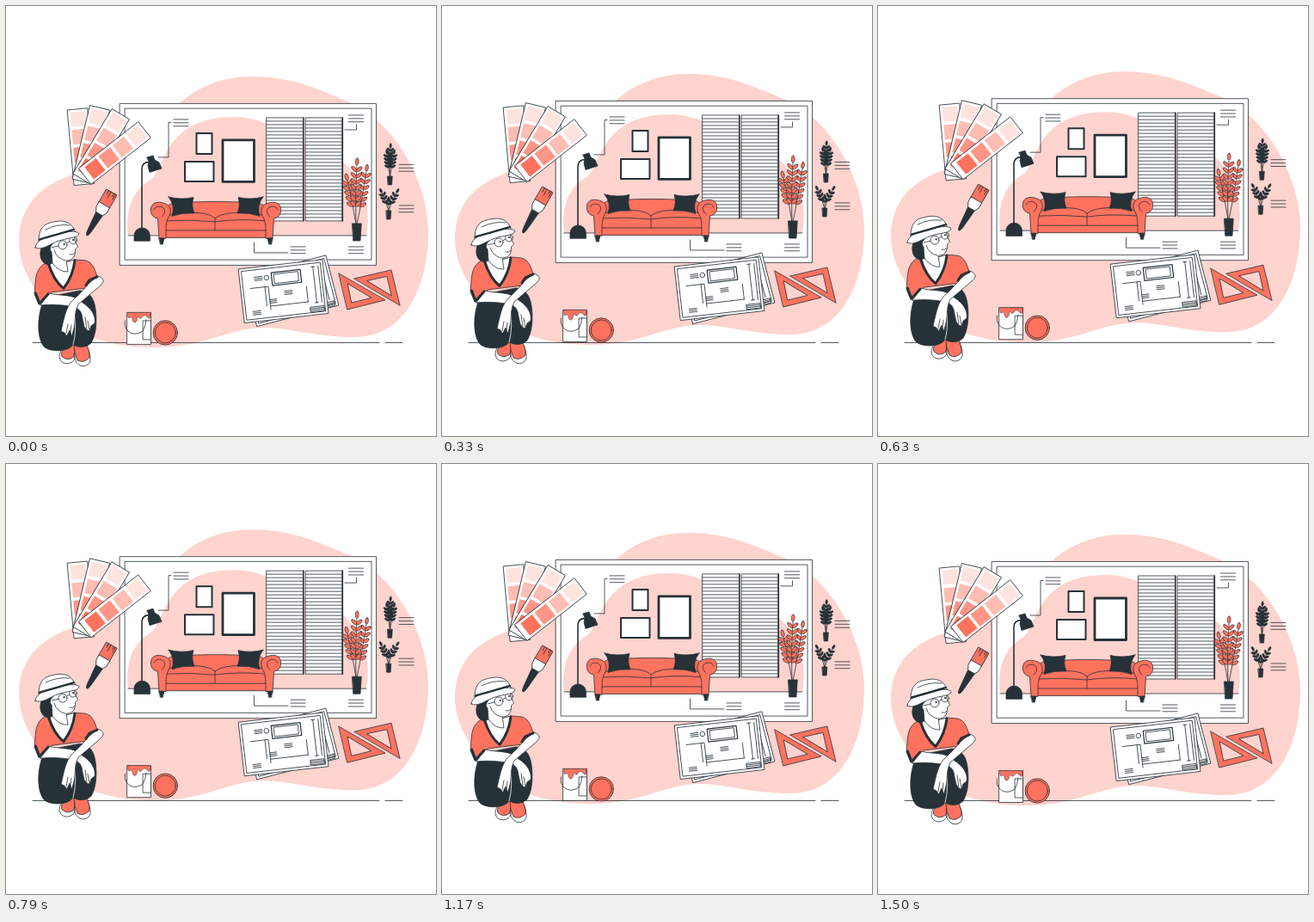
An HTML page that plays this animation: 500x500 px, repeating every 1540 ms.

```html
<!DOCTYPE html>
<html lang="en">
<head>
<meta charset="utf-8">
<title>Interior designer</title>
<style>
  html, body { margin: 0; width: 100%; height: 100%; overflow: hidden; background: #fff; }
  svg { display: block; width: 100%; height: 100%; fill: none; stroke: #263238; stroke-width: .8; stroke-linejoin: round; stroke-linecap: round; }
  .white { fill: #fff; }
  .coral { fill: #ff725e; }
  .dark { fill: #263238; }
  .pink { fill: #ffd3ce; stroke: none; }
</style>
</head>
<body>
<svg viewBox="0 0 500 500">
  <g class="float">
    <path class="pink" d="M202 113C222 95 250 82 287 82C335 82 370 100 400 112C452 135 491 205 491 262C491 330 462 385 405 385C360 385 330 374 300 374C260 374 230 397 175 397C140 397 120 392 104 387C70 370 15 330 15 272C16 225 50 204 82 195C140 180 160 150 202 113Z"/>
  </g>
  <path d="M31 391.5H434M441 391.5H461"/>
  <g class="float" id="scene"></g>
</svg>
<script>
const PERIOD = 1540, PEAK = 712, RISE = 6;

const path = (d, cls = '', extra = '') => `<path class="${cls}" d="${d}" ${extra}/>`;
const rect = (x, y, w, h, cls = '', extra = '') =>
  `<rect x="${x}" y="${y}" width="${w}" height="${h}" class="${cls}" ${extra}/>`;
const circle = (x, y, r, cls = '') => `<circle cx="${x}" cy="${y}" r="${r}" class="${cls}"/>`;
const group = (x, y, angle, body) =>
  `<g transform="translate(${x} ${y}) rotate(${angle})">${body}</g>`;
const mirror = body => `<g transform="translate(488) scale(-1 1)">${body}</g>`;
const repeat = (n, draw) => Array.from({ length: n }, (_, i) => draw(i)).join('');
const note = (x, y, w = 17, gap = 3.9) => path(repeat(3, i => `M${x} ${y + i * gap}h${w}`));

// Curved stem with a pair of leaves at each step and one at the tip
function stem([x0, y0], [cx, cy], [x1, y1], pairs, size, cls) {
  const leaf = (x, y, angle) => group(x, y, angle,
    `<ellipse cx="${size / 2}" rx="${size / 2}" ry="${size / 4}" class="${cls}" stroke-width=".6"/>`);
  const leaves = repeat(pairs, i => {
    const t = .25 + .75 * (i + 1) / pairs, s = 1 - t;
    const x = s * s * x0 + 2 * s * t * cx + t * t * x1;
    const y = s * s * y0 + 2 * s * t * cy + t * t * y1;
    const dx = s * (cx - x0) + t * (x1 - cx), dy = s * (cy - y0) + t * (y1 - cy);
    const angle = Math.atan2(dy, dx) * 180 / Math.PI;
    return i === pairs - 1 ? leaf(x, y, angle) : leaf(x, y, angle - 48) + leaf(x, y, angle + 48);
  });
  return path(`M${x0} ${y0}Q${cx} ${cy} ${x1} ${y1}`) + leaves;
}

const tints = ['#ffe3df', '#ffbdb3', '#ff9586', '#ff725e'];
const swatch = (x, y, angle) => group(x, y, angle,
  rect(0, 0, 23.3, 88, 'white') +
  repeat(4, i => rect(2.8, 3 + i * 20.6, 17.8, 17, '', `style="fill:${tints[i]};stroke:none"`)));

const swatches = swatch(71.5, 121, -5.2) + swatch(97.8, 115.7, 13.4) +
  swatch(123.5, 119.8, 31) + swatch(154, 135, 52);

const brush = group(94.5, 266, 30,
  path('M-4.5-29L-2.6-8Q-2 1 0 1Q2 1 2.6-8L4.5-29Z', 'dark') +
  rect(-7, -57, 14, 18, 'coral') +
  path('M-4-57v5M-1-57v8M3-57v4M5-57v7') +
  path('M-7-40H7V-33L4.5-28H-4.5L-7-33Z', 'white'));

const room =
  rect(132.5, 113.5, 298, 188, 'white') + rect(138.5, 119.2, 286.5, 176, 'white') +
  path('M142 267C139 240 145 215 168 202C185 192 182 129 265 129C310 129 335 160 365 167C400 175 429 220 419 267Z', 'pink') +
  path('M142 267H419');

const frames =
  rect(221.5, 148, 18, 24, 'white', 'stroke-width="2"') +
  rect(208, 181, 33.5, 23, 'white', 'stroke-width="2"') +
  rect(252, 156, 36.5, 48.5, 'white', 'stroke-width="2.8"');

const blind = x => rect(x, 130, 42.5, 120, 'white') +
  path(repeat(29, i => `M${x} ${134 + i * 4}h42.5`)) +
  path(`M${x + 42.8} 130V250`, '', 'stroke-width="1.6"');

const lamp =
  path('M158 260V190Q158 181.5 167 181.5', '', 'stroke-width="1.6"') +
  path('M149 273V267A9.2 9 0 0 1 167.4 267V273Z', 'dark') +
  path('M164 176L171 174L173 179L178 182L181 189L167 193.5L165 186L166 181Z', 'dark');

const sofaArm =
  path('M178 270L176.500 247C170 246 168 241 168.500 236C169 228 177 227 184 229.500C190 231 193 237 190 244Q186 249 186 261V270Z', 'coral') +
  path('M172 237C174 232 181 232 184 236Q186 241 181 245') +
  path('M178 270h6l-1 4h-4zM179.500 274h3v3h-3z', 'dark');
const pillow = path('M189 222Q204 226 218 222.500Q215 232 219 241Q205 240 193 244.500Q197 232 189 222Z', 'dark');
const sofa =
  path('M183 242C185 231 192 229 200 229C230 227 258 227 288 229C296 229 303 231 305 242V262H183Z', 'coral') +
  path('M182 248.500H306V269.500H182Z', 'coral') + path('M186 261H302') +
  path('M186 250Q186 241 206 240.500Q236 239 243 247Q252 239 282 240.500Q302 241 302 250Q270 247 243 251Q214 248 186 250ZM243 247V261', 'coral') +
  sofaArm + mirror(sofaArm) + pillow + mirror(pillow);

const pot = (x, y, w, h) => path(`M${x - w / 2} ${y}h${w}l${-w * .12} ${h}h${-w * .76}z`, 'dark');
const plants =
  stem([407, 254], [402, 224], [397, 203], 6, 8, 'coral') +
  stem([408, 254], [414, 226], [419, 192], 7, 7.5, 'coral') +
  stem([407, 254], [406, 225], [408, 185], 8, 8, 'coral') + pot(408, 253, 10.5, 20) +
  stem([446.500, 199], [444, 185], [443, 172], 5, 5, 'dark') +
  stem([446.500, 199], [449, 185], [451, 172], 5, 5, 'dark') +
  stem([446.500, 199], [446, 180], [447, 165], 6, 5, 'dark') + pot(446.500, 198, 5.5, 10) +
  stem([445, 239], [442, 227], [437, 217], 4, 5, 'dark') +
  stem([445, 239], [447, 228], [454, 217], 4, 5, 'dark') +
  stem([445, 239], [445, 232], [445, 227], 2, 5, 'dark') + pot(445, 238, 5.5, 10);

const notes =
  note(195, 132) + path('M177 176H189V135.500H192') +
  note(398.500, 127) + path('M394 144H407.500V138') +
  note(331, 280) + path('M288.500 275V287H328') + note(398.500, 280) +
  note(457, 184.500) + note(457, 232);

const sheet = (w, h) => rect(0, 0, w, h, 'white') + rect(3, 3, w - 6, h - 6);
const titleBlock = rect(78, 53.5, 16, 5.5) + path('M78 55.300h16M78 57.100h16');
const plans =
  group(277, 314.5, -14.5, sheet(98, 60) + path('M84 6V51M89 6V51') + titleBlock) +
  group(270.5, 306, -6.5, sheet(98, 63) + note(17, 11.5, 9, 2) + circle(31, 13.6, 2.8) +
    rect(37, 8.5, 34, 15, '', 'stroke-width="1.2"') + rect(40, 10.5, 28, 11) +
    path('M11 24H32V51M28 24V46M86 7V49M92 7V49M84 7h4M84 49h4M32 47H76M76 29V47') +
    note(11, 51, 9, 2) + note(32, 39.5, 8, 2) + note(50, 31.5, 9, 2) + titleBlock);

const setSquares = path('M387 311L441 342L397 353ZM397.500 323L425 339.500L402 345Z', 'coral', 'fill-rule="evenodd"') +
  path('M405 317L448 307L458 348ZM420 319.500L443 314.500L448 336.500Z', 'coral', 'fill-rule="evenodd"');

const paint =
  rect(141, 356.5, 27.5, 37, 'white') +
  path('M142 356.500H168V362Q166 365 164 361Q160 358 158 362Q156 365 154 361Q153 361 152 366Q149 371 147 365Q147 360 143 363Q141 362 142 356.500Z', 'coral', 'stroke-width=".5"') +
  path('M159.500 366H168.500V388H159.500Z', 'white') +
  path('M138.500 366C136 378 148 386 159 378Q162 374 163 365') +
  circle(185.3, 380, 14.2, 'coral') + circle(185.3, 380, 12, 'coral');

const woman =
  path('M68 393Q62 402 62 409Q64 416 71 416Q79 415 80 409V390Z', 'white') +
  path('M69 392Q64 401 64.500 407Q71 414 79 408L81 391Z', 'coral') +
  path('M80 394L92 392Q99 404 98 413Q95 420 87 418.500Q80 415 80 409Z', 'white') +
  path('M79 394L92 391Q98 402 97 409Q90 416 83 412Q79 404 79 394Z', 'coral') +
  path('M42 347C36 364 36 388 45 397C54 403 72 402 78 394Q90 400 99 392C105 382 106 366 104 352C102 338 96 332 86 331L50 338Z', 'dark') +
  path('M79 352Q83 376 78 394', '', 'style="stroke:#fff"') +
  path('M50 297C40 301 36 307 34.500 318L33 335L38 347L50 337L53 333L94 328L100 319L106 315C103 304 99 297 92 296L80 295L66 300Z', 'coral') +
  path('M50 298Q56 320 67 329Q78 314 80 295L66 299Z', 'white') +
  path('M49 299Q56 320 67 328.500Q78 314 80 296', '', 'stroke-width="3"') +
  path('M42 279C37 290 41 300 50 301Q58 299 57 286V272Z', 'dark') +
  path('M54 299L53 286Q49 282 54 277L57 272L79 264L80 273L83.500 280L80.500 283C81 292 77 296 70 296L72 309Q62 310 54 299Z', 'white') +
  path('M74 289Q78 290 80 287.500M56 284Q59 294 69 296') +
  circle(66, 278, 5) + circle(78, 272.5, 4.4) + path('M70.500 276L74 274M61 279L53 281') +
  circle(67.5, 277, .7, 'dark') + circle(78, 272, .7, 'dark') +
  path('M38 273C38 262 42 255 50 252.500C60 249.500 67 249.500 72 252Q78 255 81 264Q60 276 38 273Z', 'white') +
  path('M34 281C35 273 44 269 58 266C70 262 82 261 85 264.500C84 270 75 269 62 273C50 277 42 285 34 281Z', 'white') +
  path('M39 271.500Q59 266 79 260', '', 'stroke-width="2.4"') +
  path('M46 260Q60 253 74 255') +
  path('M40 348L50 334C64 338 79 334 89 345C99 351 105 361 103 369L99 372L97 378L94 377L91 373L89 364Q88 352 79 350Q60 346 40 348Z', 'white') +
  path('M95 366L97 377M92 362L94 376') +
  path('M97 322L107 314C114 317 115 320 110 325L84 347C79 357 81 367 79 375L76.500 384L74 377L70.500 384L68 380L64 378C67 366 69 352 76 344Q88 333 97 322Z', 'white') +
  path('M72 370L70 381M76 371L75 380') +
  path('M34.500 334L39 346L49 335', '', 'stroke-width="3"') +
  path('M93 325L97 319L106 315', '', 'stroke-width="3"');

document.getElementById('scene').innerHTML =
  room + frames + blind(303) + blind(348.5) + lamp + sofa + plants + notes +
  swatches + brush + plans + setSquares + paint + woman;

const floating = document.querySelectorAll('.float');
function draw(now) {
  const phase = 2 * Math.PI * (now % PERIOD - PEAK) / PERIOD;
  const y = -RISE * (1 + Math.cos(phase)) / 2;
  floating.forEach(g => g.setAttribute('transform', `translate(0 ${y.toFixed(3)})`));
  requestAnimationFrame(draw);
}
draw(performance.now());
</script>
</body>
</html>
```
